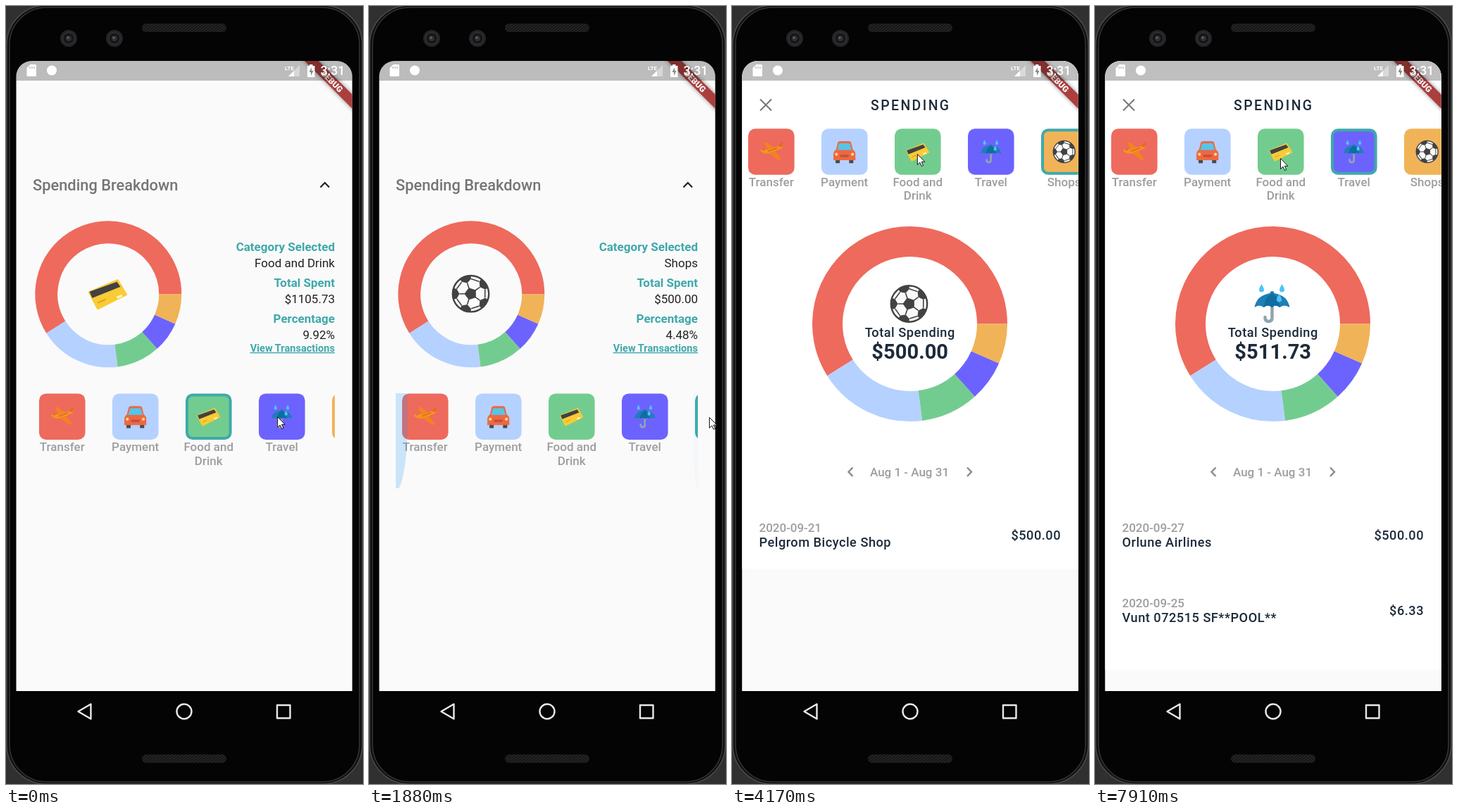
Write an HTML page that moves like this. It is 507x1105 px and loops after 8 s.

```html
<!DOCTYPE html>
<html lang="en">
<head>
<meta charset="utf-8">
<title>Spending breakdown</title>
<style>
html, body { margin: 0; width: 100%; height: 100%; overflow: hidden; background: #303030; }
svg { display: block; width: 100%; height: 100%; font-family: Roboto, sans-serif; }
.link { text-decoration: underline; text-decoration-thickness: 1px; text-underline-offset: 1px; }
.title { letter-spacing: 2.43px; }
.body { letter-spacing: .5px; }
</style>
</head>
<body>
<svg viewBox="0 0 507 1105">
  <defs>
    <clipPath id="screen"><path d="M14.500 973V100a22 22 0 0 1 22-22H469.700a22 22 0 0 1 22 22V973Z"/></clipPath>
    <clipPath id="clip1"><rect x="38" y="550" width="429" height="135"/></clipPath>
    <clipPath id="clip2"><rect x="15" y="173" width="477" height="136"/></clipPath>
    <pattern id="mesh" width="5" height="4" patternUnits="userSpaceOnUse">
      <rect width="5" height="4" fill="#171717"/><path d="M0 4L5 0" stroke="#303030"/>
    </pattern>
    <filter id="soft" x="-20%" y="-100%" width="140%" height="300%"><feGaussianBlur stdDeviation="3"/></filter>

    <g id="plane">
      <path d="M-27-3Q-19-9-9-5L16-13Q27-16 27-11Q24-7 17-5L-3 4Q-20 6-27-3Z" fill="#f7931e"/>
      <path d="M-8-5L-17-22L-11-23L6-10ZM-5 3L17 20L23 17L9-2Z" fill="#f58220"/>
      <path d="M17-12L23-22L27-22L25-11Z" fill="#e66a1c"/>
      <path d="M-21-4L-15-6M-7-1L14-9" stroke="#c9632c" stroke-width="2"/>
    </g>
    <g id="car">
      <path d="M-21 17h10v10h-10zM11 17h10v10h-10z" fill="#4a4a4a"/>
      <path d="M-20-5L-16-21Q-15-25-9-25H9Q15-25 16-21L20-5Q26-1 26 6V20H-26V6Q-26-1-20-5Z" fill="#ee6842"/>
      <path d="M-17-4L-13-18Q-12-20-8-20H8Q12-20 13-18L17-4Z" fill="#55c5ea"/>
      <circle cx="-19" cy="6" r="3.500" fill="#ffdc8a"/><circle cx="19" cy="6" r="3.500" fill="#ffdc8a"/>
      <path d="M-11 7H11L9 13H-9Z" fill="#c4503c"/>
    </g>
    <g id="card">
      <path d="M-26-2L14-19L26 1L-14 21Z" fill="#f9cb35" stroke="#f9cb35" stroke-width="3" stroke-linejoin="round"/>
      <path d="M-26-3L13-17L18-10L-22 6Z" fill="#424242"/>
      <path d="M12 4L20 1L21 4L14 7Z" fill="#fff3c0"/>
      <path d="M-14 13L-3 8" stroke="#dba31f" stroke-width="2"/>
    </g>
    <g id="umbrella">
      <path d="M0 2V20Q0 25-5 25Q-10 25-10 19" fill="none" stroke="#90a4ae" stroke-width="4.500" stroke-linecap="round"/>
      <path d="M0-18Q3-18 3-15Q22-12 25 5Q17 0 11 5Q5 0 0 5Q-6 0-12 5Q-18 0-25 5Q-22-12-3-15Q-3-18 0-18Z" fill="#1c7fb5"/>
      <path d="M-12 5Q-11-9 0-15Q10-9 11 5Q5 0 0 5Q-6 0-12 5Z" fill="#0f6da4"/>
      <path id="drop" d="M-15-28Q-20-20-18-18Q-15-15-12-18Q-10-20-15-28Z" fill="#4fc3f7"/>
      <use href="#drop" x="29"/><use href="#drop" x="25" y="14"/>
    </g>
    <g id="ball"></g>
  </defs>

  <rect width="507" height="1105" fill="#303030"/>
  <rect x="1" y="-1" width="505" height="1106" rx="56" fill="#101011" stroke="#4a4a4c" stroke-width="1.500"/>
  <rect x="5" y="2" width="497" height="1100" rx="53" fill="#040404" stroke="#343436" stroke-width="1.500"/>
  <g id="hardware"></g>
  <rect x="193" y="25" width="120" height="12" rx="6" fill="url(#mesh)"/>
  <rect x="193" y="1063" width="120" height="12" rx="6" fill="url(#mesh)"/>
  <g fill="none" stroke="#e9e9e9" stroke-width="2.400" stroke-linejoin="round">
    <path d="M102.500 1002L120.500 991.500V1012.500Z"/><circle cx="253" cy="1002" r="10.500"/><rect x="385" y="993" width="18.500" height="18.500"/>
  </g>

  <g clip-path="url(#screen)">
    <rect x="14" y="78" width="479" height="895" fill="#fafafa"/>
    <g id="home"></g>
    <g id="detail"></g>
    <g transform="translate(463 107) rotate(45)">
      <rect x="-80" y="-7" width="160" height="14" filter="url(#soft)" opacity=".450"/>
      <rect x="-80" y="-7" width="160" height="14" fill="#ac3e3e"/>
      <text y="4.200" font-size="11.800" font-weight="900" fill="#fff" text-anchor="middle">DEBUG</text>
    </g>
    <rect x="14" y="78" width="479" height="28" opacity=".250"/>
    <g fill="#fff">
      <path d="M34.500 83H41.500Q43 83 43 84.500V98.500Q43 100 41.500 100H31Q29.500 100 29.500 98.500V88Z"/>
      <path d="M34 86v3M37 86v3M40 86v3" stroke="#bababa" stroke-width="1.300"/>
      <circle cx="65" cy="91.500" r="7"/>
      <text x="396" y="90.500" font-size="8" font-weight="700">LTE</text>
      <path d="M417 84V100H401Z" opacity=".400"/><path d="M409 92V100H401Z"/>
      <path d="M431 83H435.500V85H438.500V101H428V85H431Z"/>
      <path d="M434 87L430.500 94H433V99L436.500 92H434Z" fill="#888"/>
      <text x="446.500" y="98.300" font-size="17.600" font-weight="500">3:31</text>
    </g>
  </g>
  <path id="cursor" d="M.5.5V15.500L4 12.200L6.500 17.500L8.800 16.500L6.400 11.300H11Z" fill="#fff" stroke="#111"/>
</svg>
<script>
const $ = id => document.getElementById(id);
const clamp = (v, low, high) => Math.min(high, Math.max(low, v));
const TEAL = '#3fa9ab', GRAY = '#9e9e9e', INK = '#1c2b3a', TEXT = '#212121';
const CATEGORIES = [
  { name: 'Transfer', color: '#ee6a5d', icon: 'plane', degrees: 212.2 },
  { name: 'Payment', color: '#b5d1ff', icon: 'car', degrees: 65.1 },
  { name: 'Food and Drink', color: '#73cc8f', icon: 'card', degrees: 34.5, total: '$1105.73', share: '9.92%' },
  { name: 'Travel', color: '#6c63ff', icon: 'umbrella', degrees: 24.3, total: '$511.73', share: '4.59%' },
  { name: 'Shops', color: '#f1b357', icon: 'ball', degrees: 23.9, total: '$500.00', share: '4.48%' }
];
const PURCHASES = {
  Travel: [['2020-09-27', 'Orlune Airlines', '$500.00'], ['2020-09-25', 'Vunt 072515 SF**POOL**', '$6.33']],
  Shops: [['2020-09-21', 'Pelgrom Bicycle Shop', '$500.00']]
};

// Where the pointer turns: time, x, y.
const POINTER = [
  [0, 385, 583], [390, 456, 587], [670, 467, 586], [950, 467, 586], [1220, 437, 587],
  [1490, 350, 449], [1880, 483, 584], [2510, 430, 471], [2750, 401, 481], [3020, 408, 488], [3630, 408, 488],
  [3900, 464, 290], [4170, 263, 210], [4600, 176, 192], [4830, 215, 190], [5220, 395, 206],
  [6000, 422, 212], [6420, 470, 206], [6810, 364, 236], [7080, 358, 200], [7630, 270, 217], [7910, 263, 216]
];

function pointer(t) {
  const i = POINTER.findIndex(p => p[0] > t);
  if (i < 0) return POINTER.at(-1).slice(1);
  const [t0, x0, y0] = POINTER[i - 1], [t1, x1, y1] = POINTER[i];
  const p = (t - t0) / (t1 - t0);
  return [x0 + (x1 - x0) * p, y0 + (y1 - y0) * p];
}

// The row follows the pointer; whatever is pulled past an end feeds that edge's fading glow.
function drag(start, end, limit, t) {
  const step = 10, fade = Math.exp(-step / 300), pull = 35;
  let scroll = 0, left = 0, right = 0;
  for (let s = start + step; s <= Math.min(t, start + 2000); s += step) {
    left *= fade;
    right *= fade;
    if (s > end) continue;
    const wanted = scroll + pointer(s - step)[0] - pointer(s)[0];
    scroll = clamp(wanted, 0, limit);
    left = Math.min(1, left + Math.max(0, scroll - wanted) / pull);
    right = Math.min(1, right + Math.max(0, wanted - scroll) / pull);
  }
  return { scroll, left, right };
}

const label = (x, y, str, size, weight, fill, anchor = 'start', style = '') =>
  `<text x="${x}" y="${y}" font-size="${size}" font-weight="${weight}" fill="${fill}" text-anchor="${anchor}" class="${style}">${str}</text>`;

const icon = (id, x, y, scale = 1) =>
  `<use href="#${id}" transform="translate(${x} ${y}) scale(${scale})"/>`;

const line = (d, color, width) =>
  `<path d="${d}" fill="none" stroke="${color}" stroke-width="${width}"/>`;

function donut(x, y, outer, inner) {
  let angle = 360;
  return CATEGORIES.map(({ color, degrees }) => {
    angle -= degrees;
    return `<circle r="${(outer + inner) / 2}" fill="none" stroke="${color}" stroke-width="${outer - inner}"
      pathLength="360" stroke-dasharray="${degrees} 400" transform="translate(${x} ${y}) rotate(${angle})"/>`;
  }).join('');
}

function tiles(x0, y, selected) {
  return CATEGORIES.map((c, i) => {
    const x = x0 + 104 * i, mid = x + 32.7;
    const words = c.name.replace('and ', 'and|').split('|');
    const inset = i === selected ? 2 : 0, side = 65.6 - 2 * inset;
    return `<rect x="${x + inset}" y="${y + inset}" width="${side}" height="${side}" rx="${10 - inset}"
        fill="${c.color}" stroke="${TEAL}" stroke-width="${2 * inset}"/>`
      + icon(c.icon, mid, y + 32.8, .6)
      + words.map((w, k) => label(mid, y + 81.7 + 19.5 * k, w, 17, 500, GRAY, 'middle')).join('');
  }).join('');
}

function row(clip, leftEdge, rightEdge, x, y, selected, { scroll, left, right }) {
  const glow = (cx, g) => `<ellipse cx="${cx}" cy="${y + 35}" rx="${5 + 12 * g}" ry="103" fill="#2196f3" opacity="${.22 * g}"/>`;
  return `<g clip-path="url(#${clip})">${tiles(x - scroll, y, selected)}${glow(leftEdge, left)}${glow(rightEdge, right)}</g>`;
}

function home(t) {
  const selected = t < 270 ? 2 : t < 950 ? 3 : 4, c = CATEGORIES[selected];
  const right = (y, str, weight, fill, size = 17, style) => label(467, y, str, size, weight, fill, 'end', style);
  return label(38, 261.8, 'Spending Breakdown', 21.85, 500, '#757575')
    + line('M446.500 257.500L452.800 251L459 257.500', '#222', 2.2)
    + donut(145.3, 409.3, 104, 72) + icon(c.icon, 144.5, 408.7)
    + right(347.5, 'Category Selected', 700, TEAL) + right(371, c.name, 400, TEXT)
    + right(398.8, 'Total Spent', 700, TEAL) + right(421.5, c.total, 400, TEXT)
    + right(449.5, 'Percentage', 700, TEAL) + right(472.7, c.share, 400, TEXT)
    + right(490.8, 'View Transactions', 700, TEAL, 14.57, 'link')
    + row('clip1', 38, 467, 47, 550.4, selected, drag(1220, 1880, 66, t));
}

function spinner(t) {
  const start = -50 + (t - 3390) * .45;
  return `<circle r="21.850" fill="none" stroke="#2196f3" stroke-width="4.860" pathLength="360"
    stroke-dasharray="140 400" transform="translate(252.500 713.700) rotate(${start})"/>`;
}

function purchases(name) {
  return PURCHASES[name].map(([date, shop, amount], i) => {
    const y = 107 * i;
    return label(38.5, 747 + y, date, 17, 500, GRAY) + label(38.5, 768 + y, shop, 18.2, 500, INK, 'start', 'body')
      + label(467, 758 + y, amount, 18.2, 500, INK, 'end', 'body');
  }).join('');
}

function detail(t) {
  const selected = t < 6960 ? 4 : 3, c = CATEGORIES[selected];
  const loading = t < 3900 || (t >= 6960 && t < 7080);
  const listEnd = selected === 4 ? 799.5 : 942.5;
  return `<rect x="14" y="78" width="479" height="895" fill="#fafafa"/>`
    + (loading ? '' : `<rect x="14" y="78" width="479" height="${listEnd - 78}" fill="#fff"/>`)
    + line('M40 132.500L56 148.500M56 132.500L40 148.500', '#777', 2)
    + label(197, 147.8, 'SPENDING', 19.42, 500, INK, 'start', 'title')
    + row('clip2', 15, 492, 23, 174.2, selected, drag(4170, 5220, 39, t))
    + donut(252.5, 451.5, 138.5, 95.5) + icon(c.icon, 251.5, 423)
    + label(252.7, 469.7, 'Total Spending', 18.2, 500, INK, 'middle', 'body')
    + label(252.7, 500.5, c.total, 29.13, 700, INK, 'middle')
    + line('M171.500 655.500L165.500 661.700L171.500 668M334 655.500L340 661.700L334 668', '#8c8c8c', 2.4)
    + label(252, 668, 'Aug 1 - Aug 31', 17, 500, GRAY, 'middle')
    + (loading ? spinner(t) : purchases(c.name));
}

function drawBall() {
  const seams = [0, 1, 2, 3, 4].map(i => `<g transform="rotate(${72 * i})">
    <path d="M0-16L7-20L8-25Q0-28-8-25L-7-20Z" fill="#424242"/>
    <path d="M0-8V-16M7-20L16.500-13" stroke="#424242" stroke-width="1.600"/></g>`).join('');
  $('ball').innerHTML = `<circle r="26" fill="#fafafa"/><g transform="rotate(-18)">${seams}
    <path d="M0-9L8.600-2.800L5.300 7.300H-5.300L-8.600-2.800Z" fill="#424242"/></g>
    <circle r="25.700" fill="none" stroke="#424242" stroke-width="2.400"/>`;
}

drawBall();
$('hardware').innerHTML = [89, 154].map(x => `<g transform="translate(${x} 46)">
  <circle r="12" fill="#252527"/><circle r="8" fill="#151517" stroke="#38383a"/>
  <circle r="4" fill="#303033"/><circle cx="-1" cy="-1" r="1.500" fill="#68686c"/></g>`).join('');

const previous = {};
function update(id, markup) {
  if (previous[id] !== markup) $(id).innerHTML = previous[id] = markup;
}

function render(now) {
  const t = now % 8000;
  const enter = clamp((t - 3150) / 300, 0, 1);
  update('home', enter < 1 ? home(t) : '');
  update('detail', enter > 0 ? detail(t) : '');
  $('detail').setAttribute('opacity', enter ** 1.7);
  $('detail').setAttribute('transform', `translate(0 ${224 * (1 - enter) ** 2.3})`);
  $('cursor').setAttribute('transform', `translate(${pointer(t)})`);
}

const begin = performance.now();
function tick() {
  render(performance.now() - begin);
  requestAnimationFrame(tick);
}
tick();
</script>
</body>
</html>
```
